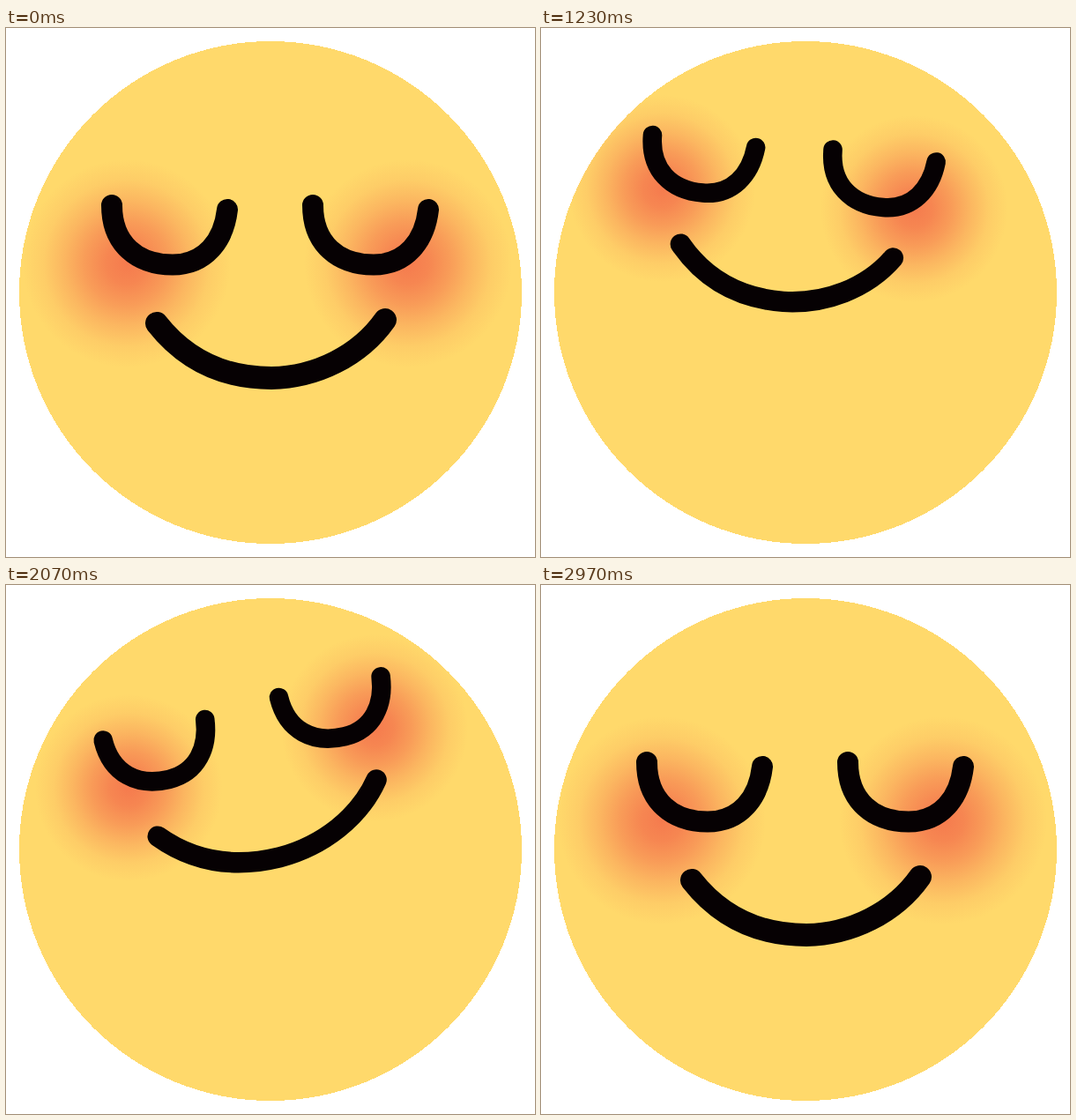
An HTML page for the animation above (3.18 s loop, 600 by 600 pixels).

```html
<!DOCTYPE html>
<html lang="en">
<head>
<meta charset="utf-8">
<title>Content face</title>
<style>
  html, body { margin: 0; width: 100%; height: 100%; overflow: hidden; background: #fff; }
  svg { display: block; width: 100%; height: 100%; }
  .line { fill: none; stroke: #060103; stroke-linecap: round; stroke-linejoin: round; }
</style>
</head>
<body>
<svg viewBox="0 0 600 600">
  <defs>
    <radialGradient id="blush">
      <stop offset="0" stop-color="#f57b4e"/>
      <stop offset=".2" stop-color="#f57b4e" stop-opacity=".88"/>
      <stop offset=".4" stop-color="#f57b4e" stop-opacity=".65"/>
      <stop offset=".6" stop-color="#f57b4e" stop-opacity=".37"/>
      <stop offset=".8" stop-color="#f57b4e" stop-opacity=".13"/>
      <stop offset="1" stop-color="#f57b4e" stop-opacity="0"/>
    </radialGradient>
    <clipPath id="disc"><circle cx="300" cy="300" r="285"/></clipPath>
    <path id="eye" class="line" stroke-width="24"
      d="M120 201C120 245 149 268.5 189 268.5C226 268.5 247 241 251 206"/>
  </defs>
  <circle cx="300" cy="300" r="285" fill="#ffd96b" shape-rendering="crispEdges"/>
  <g clip-path="url(#disc)">
    <g id="face">
      <circle cx="137" cy="267" r="118" fill="url(#blush)"/>
      <circle cx="456" cy="267" r="118" fill="url(#blush)"/>
      <use href="#eye"/>
      <use href="#eye" x="228"/>
      <path id="mouth" class="line" stroke-width="26"/>
    </g>
  </g>
</svg>
<script>
const LOOP = 3180, STEP = 30, LAST = 2970;
const PIVOT = { x: 300.5, y: 333 };

// Each track is a list of [time, value].
const tracks = {
  lift: [[0, 0], [660, 1], [2520, 1], [LAST, 0]],
  tilt: [[0, 0], [420, 6.8], [800, 14], [1230, 4.6], [1680, -9.5], [1920, -14], [2490, -10.8], [LAST, 0]],
  sway: [[0, 0], [940, -0.8], [1270, -22.5], [1700, 35.5], [2150, -8], [2490, 1.5], [LAST, 0]],
  smile: [[0, 1], [840, 1], [1800, 1.1], [2000, 1.1], [LAST, 1]]
};

const slope = (a, b) => (b[1] - a[1]) / (b[0] - a[0]);

// Flat at ends and turning points, harmonic mean elsewhere.
function tangent(track, i) {
  if (i === 0 || i === track.length - 1) return 0;
  const a = slope(track[i - 1], track[i]);
  const b = slope(track[i], track[i + 1]);
  return a * b > 0 ? 2 * a * b / (a + b) : 0;
}

function sample(track, t) {
  let i = 0;
  while (i < track.length - 2 && t >= track[i + 1][0]) i++;
  const [t0, v0] = track[i], [t1, v1] = track[i + 1];
  const h = t1 - t0, u = (t - t0) / h, w = 1 - u;
  return v0 * w * w * (1 + 2 * u) + v1 * u * u * (3 - 2 * u)
    + h * u * w * (w * tangent(track, i) - u * tangent(track, i + 1));
}

function mouthPath(stretch) {
  const p = (x, y) => `${PIVOT.x + (x - PIVOT.x) * stretch} ${y}`;
  return `M${p(171, 335)}C${p(204, 377)} ${p(247, 397)} ${p(301, 397)}`
    + `C${p(352, 396)} ${p(401, 372)} ${p(430, 331)}`;
}

const face = document.getElementById("face");
const mouth = document.getElementById("mouth");

function draw(now) {
  const t = Math.min(Math.floor((now % LOOP) / STEP) * STEP, LAST);
  const lift = sample(tracks.lift, t);
  const x = PIVOT.x + sample(tracks.sway, t);
  const y = PIVOT.y - 80 * lift;
  face.setAttribute("transform", `translate(${x} ${y}) rotate(${sample(tracks.tilt, t)}) `
    + `scale(${1 - 0.1 * lift}) translate(${-PIVOT.x} ${-PIVOT.y})`);
  mouth.setAttribute("d", mouthPath(sample(tracks.smile, t)));
}

const start = performance.now();
function tick() {
  draw(performance.now() - start);
  requestAnimationFrame(tick);
}
tick();
</script>
</body>
</html>
```
